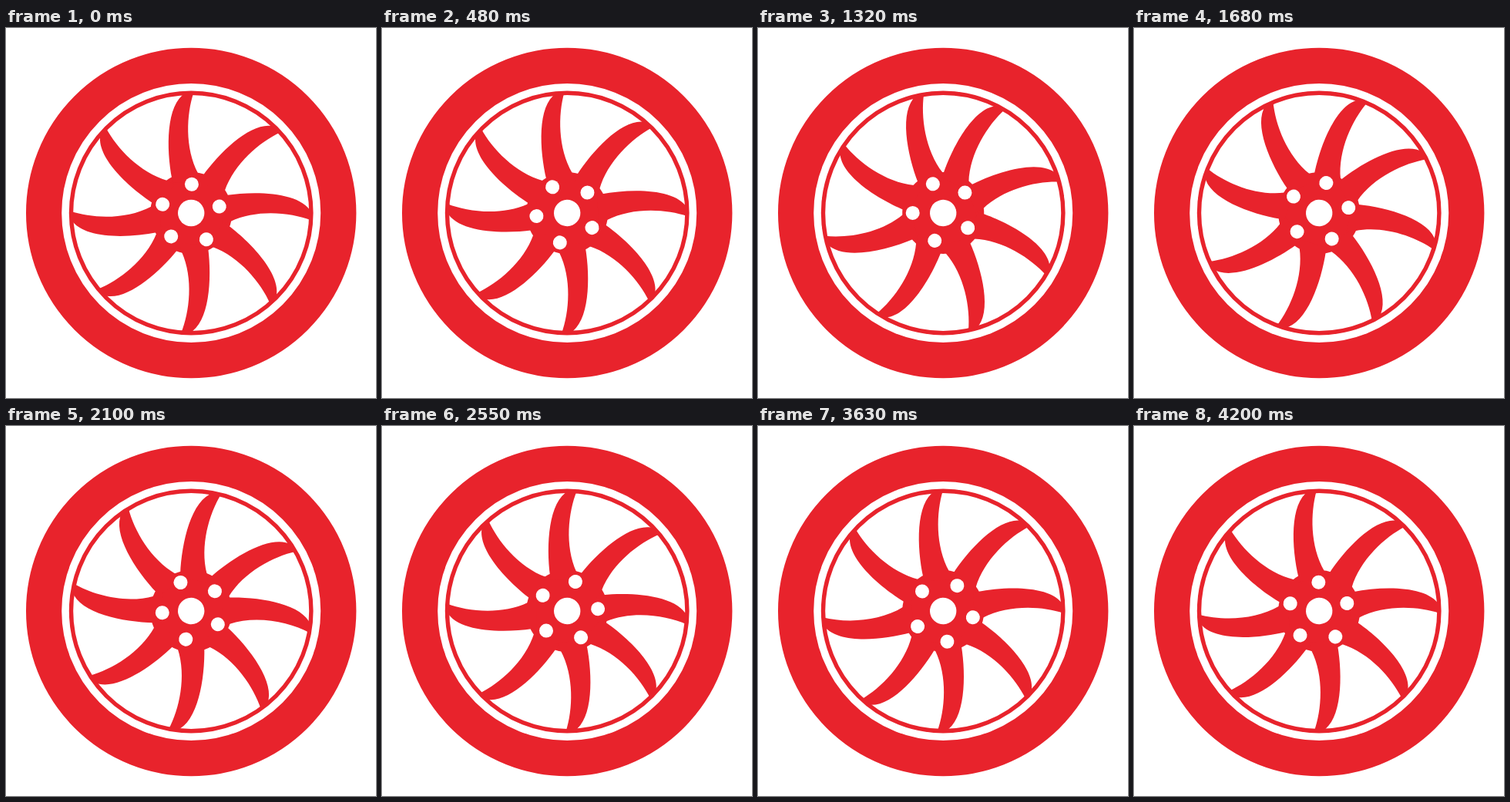
Recreate the animation shown at these times as an HTML page. Size 480 by 480 pixels, loop 4230 ms.

```html
<!DOCTYPE html>
<html lang="en">
<head>
<meta charset="utf-8">
<title>Spinning wheel</title>
<style>
  html, body { margin: 0; height: 100%; overflow: hidden; background: #fff; }
  svg { display: block; width: 100%; height: 100%; }
</style>
</head>
<body>
<svg viewBox="0 0 480 480" fill="#e8232c">
  <g transform="translate(240.2 240)">
    <circle r="191.1" fill="none" stroke="#e8232c" stroke-width="46.2"/>
    <circle r="155.7" fill="none" stroke="#e8232c" stroke-width="5.4"/>
    <g id="wheel">
      <circle r="53"/>
      <g id="spokes"></g>
      <g id="holes" fill="#fff"><circle r="17.2"/></g>
    </g>
  </g>
</svg>
<script>
  const STEP = 30, LOOP = 4230, HALF = 1980;
  const SPOKE = 'M40 -22L45 -23C85 -29 142 -27 156 -1L156 9.5C128 -1 85 -5 51 11L40 14Z';
  // Small angular deviations of the eight spokes, clockwise from the top
  const skew = [-2.3, -0.6, 0, 0.5, 1.3, 2.3, -2.7, -3.5];
  // Lug holes: angle clockwise from the top, distance from the centre
  const lugs = [[1.1, 37.3], [77, 37.5], [150.1, 39.5], [220.5, 40], [286.9, 38.7]];

  const byId = id => document.getElementById(id);

  function add(parent, tag, attrs) {
    const el = document.createElementNS('http://www.w3.org/2000/svg', tag);
    for (const name in attrs) el.setAttribute(name, attrs[name]);
    parent.append(el);
  }

  skew.forEach((d, i) =>
    add(byId('spokes'), 'path', { d: SPOKE, transform: `rotate(${45 * i - 90 + d})` }));
  lugs.forEach(([angle, dist]) =>
    add(byId('holes'), 'circle', { r: 9, cy: -dist, transform: `rotate(${angle})` }));

  // The second half turn is slightly slower than the first
  const turn = t => t < HALF ? 180 * t / HALF : 180 + 180 * (t - HALF) / (LOOP - HALF);

  const wheel = byId('wheel');
  const start = performance.now();
  function draw() {
    const t = (performance.now() - start) % LOOP;
    wheel.setAttribute('transform', `rotate(${turn(Math.floor(t / STEP) * STEP)})`);
    requestAnimationFrame(draw);
  }
  draw();
</script>
</body>
</html>
```
